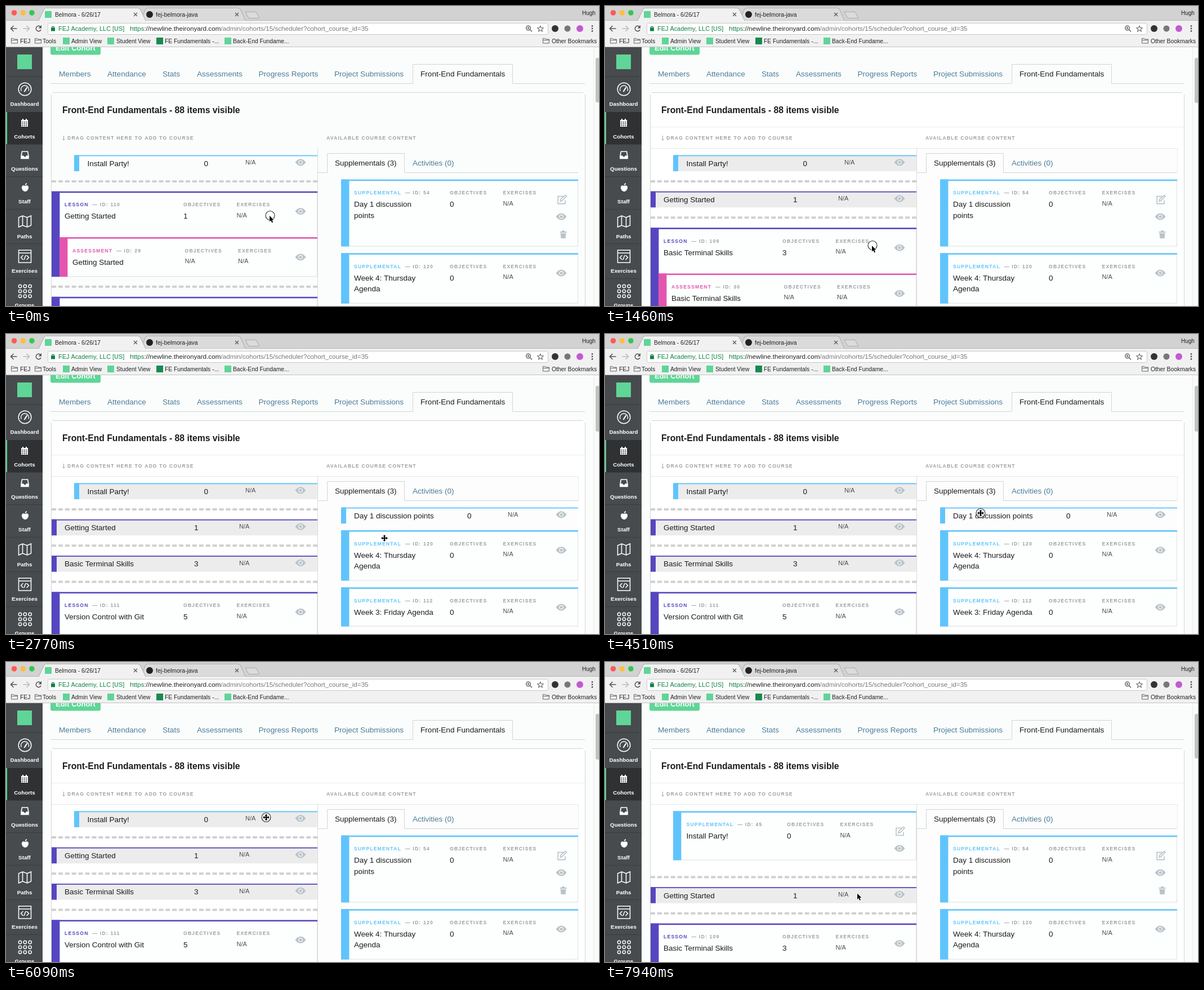
An HTML page with a canvas for the animation above (7990 ms loop, 1053 px wide and 532 px high).

```html
<!DOCTYPE html>
<html lang="en">
<head>
<meta charset="utf-8">
<title>Course scheduler</title>
<style>
  html, body { margin: 0; width: 100%; height: 100%; overflow: hidden; background: #fbfdfd; }
  canvas { display: block; }
</style>
</head>
<body>
<canvas id="stage" width="1053" height="532"></canvas>
<script>
const c = document.getElementById('stage').getContext('2d');
const LOOP = 7990;
const SANS = '"Liberation Sans", Arial, sans-serif';
const BLUE = '#60c4fc', PURPLE = '#5646c0', PINK = '#e455b0', GREEN = '#5fd597';
const INK = '#1c1c1c', LABEL = '#9c9fa2', LINK = '#4b7c98', ICON = '#bac3c8', LINE = '#d2d4d5';

// Drawing helpers
function rect(x, y, w, h, fill) { c.fillStyle = fill; c.fillRect(x, y, w, h); }
function round(x, y, w, h, r, fill, stroke) {
  c.beginPath(); c.roundRect(x, y, w, h, r); paint(fill, stroke);
}
function disc(x, y, r, fill, stroke, width) {
  c.beginPath(); c.arc(x, y, r, 0, 7); paint(fill, stroke, width);
}
function paint(fill, stroke, width = 1) {
  if (fill) { c.fillStyle = fill; c.fill(); }
  if (stroke) { c.strokeStyle = stroke; c.lineWidth = width; c.stroke(); }
}
function poly(points, fill, stroke, width) {
  c.beginPath();
  for (let i = 0; i < points.length; i += 2) c.lineTo(points[i], points[i + 1]);
  paint(fill, stroke, width);
}
function shape(d, x, y, fill, stroke, width) {
  c.save(); c.translate(x, y);
  const p = new Path2D(d);
  if (fill) { c.fillStyle = fill; c.fill(p); }
  if (stroke) { c.strokeStyle = stroke; c.lineWidth = width || 1; c.stroke(p); }
  c.restore();
}
function text(s, x, y, size = 13.5, color = INK, weight = '', align = 'left', gap = 0) {
  c.font = `${weight} ${size}px ${SANS}`;
  c.letterSpacing = gap + 'px';
  c.textAlign = align;
  c.fillStyle = color;
  c.fillText(s, x, y);
}
const label = (s, x, y, color = LABEL) => text(s, x, y + 3, 8.6, color, 'bold', 'left', 1.2);
const small = (s, x, y) => text(s, x, y + 4, 11, '#4a4d50');

// Small icons
function eye(x, y) {
  shape('M-9.5 0Q-5-6 0-6T9.5 0Q5 6 0 6T-9.5 0Z', x, y, ICON);
  disc(x, y, 3.8, '#fff');
  disc(x, y, 2.6, ICON);
}
function edit(x, y) {
  shape('M3-6H-7V7H6V1M-3 3L-2-1L6-8L8-6L0 2Z', x, y, null, ICON, 1.6);
}
function trash(x, y) {
  shape('M-6-5H6V-3H-6ZM-2-7H2V-5H-2ZM-5-2H5L4 7H-4Z', x, y, ICON);
}
function folder(x, y) {
  shape('M.5 1.5H4.5L6 3H11.5V10H.5ZM.5 4.5H11.5', x, y, null, '#666');
}

function browser() {
  rect(0, 0, 1053, 26, '#d3d2d3');
  rect(0, 25, 1053, 1, '#b4b4b4');
  rect(0, 26, 1053, 47, '#f2f1f2');
  ['#fc5b57', '#fdbd41', '#35c84a'].forEach((col, i) => disc(14.5 + i * 15.7, 12, 4.8, col));
  poly([239, 25.5, 248, 5, 251, 3.5, 412, 3.5, 416, 5, 425, 25.5], '#dcdbdc', '#aaa');
  poly([425, 10.5, 444, 10.5, 450, 21.5, 431, 21.5, 425, 10.5], '#dcdbdc', '#aaa');
  poly([58, 26, 68, 5, 71, 3.5, 234, 3.5, 238, 5, 248, 26], '#f2f1f2', '#aaa');
  rect(59, 25, 188, 2, '#f2f1f2');
  rect(69, 9, 12, 12, GREEN);
  disc(255, 15, 6, '#222');
  text('Belmora - 6/26/17', 87, 18.5, 10.2, '#222');
  text('fej-belmora-java', 266, 18.5, 10.4, '#222');
  for (const x of [230, 410]) shape('M-3-3L3 3M3-3L-3 3', x, 15, null, '#555', 1.2);
  text('Hugh', 1023, 16, 10, '#222');

  // Toolbar
  shape('M5-5L0 0L5 5M0 0H11', 8.5, 40, null, '#555', 1.6);
  shape('M6-5L11 0L6 5M11 0H0', 30.5, 40, null, '#bcbcbc', 1.6);
  c.beginPath(); c.arc(58, 40, 4.6, .5, 5.4); paint(null, '#555', 1.6);
  poly([63, 34, 63, 39.5, 57.5, 39.5], '#555');
  round(74.5, 30.5, 888, 20, 2, '#fff', '#c9c9c9');
  rect(80, 38.5, 7, 6, '#0b8043');
  c.beginPath(); c.arc(83.5, 38.5, 2.2, Math.PI, 0); paint(null, '#0b8043', 1.3);
  text('FEJ Academy, LLC [US]', 93, 44, 10.9, '#0b8043');
  text('https', 220, 44, 11.67, '#0b8043');
  text('://newline.theironyard.com', 245.3, 44, 11.67, '#222');
  text('/admin/cohorts/15/scheduler?cohort_course_id=35', 381.5, 44, 11.67, '#777');
  disc(927.5, 39, 3.8, null, '#555', 1.3);
  shape('M3 3L6.5 6.5M-2 0H2M0-2V2', 927.5, 39, null, '#555', 1.2);
  c.beginPath();
  for (let i = 0; i < 11; i++) {
    const r = i % 2 ? 2.4 : 5.5, a = i * Math.PI / 5 - Math.PI / 2;
    c.lineTo(949 + r * Math.cos(a), 40.5 + r * Math.sin(a));
  }
  paint(null, '#666', 1.1);
  disc(975, 40, 6, '#333');
  disc(997, 40, 5.5, '#777');
  disc(1019, 40, 6, '#c05bd0');
  for (const y of [35.5, 40, 44.5]) disc(1041, y, 1.4, '#555');

  // Bookmarks
  const mark = (s, x) => text(s, x, 65.5, 10.3, '#222');
  folder(9, 56); mark('FEJ', 25);
  folder(51, 56); mark('Tools', 65);
  rect(101, 56, 12, 12, GREEN); mark('Admin View', 116);
  rect(180, 56, 12, 12, GREEN); mark('Student View', 196);
  rect(267, 56, 12, 12, '#188a50'); mark('FE Fundamentals -...', 282);
  rect(388, 56, 12, 12, GREEN); mark('Back-End Fundame...', 403);
  folder(953, 56); mark('Other Bookmarks', 969);
  rect(0, 72, 1053, 1, '#c4c4c4');
}

function sidebar() {
  rect(0, 73, 65, 459, '#484b4e');
  for (const y of [125, 245, 302, 360, 421, 483]) rect(0, y, 65, 1, '#3a3d40');
  rect(0, 188, 65, 57, '#2f3133');
  rect(0, 188, 2, 57, GREEN);
  rect(20, 86, 26, 26, GREEN);
  [['Dashboard', 173.5], ['Cohorts', 231], ['Questions', 288.5], ['Staff', 346],
   ['Paths', 408], ['Exercises', 469.5], ['Groups', 530.5]]
    .forEach(([s, y]) => text(s, 33, y + 3.5, 9.8, '#fff', 'bold', 'center'));

  const w = '#fff';
  disc(33.5, 147.5, 11.3, null, w, 1.5);
  c.beginPath(); c.arc(33.5, 148, 7, 2.7, 6.7); paint(null, w, 1.3);
  shape('M-1 4L4-4', 33.5, 148, null, w, 2);
  shape('M-6-5H6V7H-6ZM-4-7H-2V-5H-4ZM2-7H4V-5H2Z', 33, 207, w);
  for (let i = 0; i < 9; i++) rect(28.5 + i % 3 * 3.4, 205 + (i / 3 | 0) * 3, 2, 1.6, '#2f3133');
  shape('M-5-6H5L6.5 2V6.5H-6.5V2ZM-6 2H-3L-2 4H2L3 2H6', 33.5, 264, null, w, 1.7);
  shape('M-6 2H-3L-2 4H2L3 2H6V7H-6Z', 33.5, 264, w);
  shape('M0-3C7-6 8 2 3 6Q0 8-3 6C-8 2-7-6 0-3ZM0-4Q0-8 3-8Q3-5 0-4Z', 34, 322, w);
  shape('M-11-7L-4-10L4-7L11-10V7L4 10L-4 7L-11 10ZM-4-10V7M4-7V10', 33.5, 382, null, w, 1.5);
  shape('M-11-11H11V11H-11ZM-11-6H11M-3-2L-7 2L-3 6M3-2L7 2L3 6M1.5-2L-1.5 6', 33.5, 444, null, w, 1.5);
  for (let i = 0; i < 9; i++) disc(25 + i % 3 * 8.8, 497 + (i / 3 | 0) * 8.8, 2.7, null, w, 1.4);
}

function page(settled) {
  rect(65, 73, 988, 459, '#fbfdfd');
  if (settled) {
    rect(81, 155, 947, 377, '#fff');
    rect(554, 253, 462, 279, '#fdfdfd');
    rect(81, 214, 946, 1, '#ececec');
    rect(81, 252, 935, 1, '#e6e7e7');
    rect(1016, 252, 1, 43, '#ececec');
  }
  round(79, 60, 89, 26.5, 3, GREEN);
  text('Edit Cohort', 88, 79, 13, '#fff', 'bold');
  [['Members', 94], ['Attendance', 180], ['Stats', 278], ['Assessments', 339],
   ['Progress Reports', 448.5], ['Project Submissions', 583]]
    .forEach(([s, x]) => text(s, x, 125.3, 13.6, LINK));
  poly([79, 137.5, 722.5, 137.5, 722.5, 103.5, 899.5, 103.5, 899.5, 137.5, 1028, 137.5], null, LINE);
  text('Front-End Fundamentals', 736, 125.3, 13.6);
  rect(83, 153, 942, 1, LINE);
  rect(80, 157, 1, 375, LINE);
  rect(1028, 157, 1, 375, LINE);
  text('Front-End Fundamentals - 88 items visible', 100, 190.4, 15.7, INK, 'bold');
  shape('M0-4V4M-2 2L0 4L2 2', 102.5, 234, null, LABEL);
  label('DRAG CONTENT HERE TO ADD TO COURSE', 109, 233.5);
  label('AVAILABLE COURSE CONTENT', 569, 233.5);
  rect(553, 252, 1, 280, '#dcdddd');
  poly([554, 295.5, 570.5, 295.5, 570.5, 261.5, 707.5, 261.5, 707.5, 295.5, 1016, 295.5], null, LINE);
  text('Supplementals (3)', 584, 283);
  text('Activities (0)', 722, 283, 13.5, LINK);
}

function closedRow(o) {
  const { x, y, right, color } = o;
  rect(x, y, right - x, 28.5, o.fill);
  rect(x, y, right - x, 1.8, color);
  rect(x, y, 9, 28.5, color);
  text(o.title, o.textX, y + 19.3);
  text(o.count, o.countX, y + 19.3);
  small('N/A', o.naX, y + 12.7);
  eye(right - 30, y + 12.7);
}

// "objX" is the column of objectives; exercises stand 94.5 px to its right.
function card(o) {
  const { x, y, right, color, objX } = o;
  rect(x, y, right - x, o.h, '#fdfefe');
  rect(x, y + o.h - 1, right - x, 1, '#dfe1e2');
  rect(right - 1, y, 1, o.h, '#dfe1e2');
  rect(x, y, right - x, 2.6, color);
  rect(x, y, 14.4, o.h, color);
  const tx = o.textX;
  label(o.kind, tx, y + 23.5, color);
  label('— ID: ' + o.id, tx + c.measureText(o.kind).width + 7, y + 23.5);
  label('OBJECTIVES', objX, y + 23.5);
  label('EXERCISES', objX + 94.5, y + 23.5);
  o.title.split('|').forEach((s, i) => text(s, tx, y + 48.5 + i * 19.7));
  if (o.count === 'N/A') small('N/A', objX, y + 42);
  else text(o.count, objX, y + 48.5);
  small('N/A', objX + 94.5, y + 42);
  if (o.editable) { edit(right - 29, y + 36); eye(right - 30, y + 66); }
  else eye(right - 30, y + 35.3);
  if (o.removable) trash(right - 26.5, y + 97.5);
}

function dashes(y) {
  c.setLineDash([8, 3.9]);
  poly([81, y, 553, y], null, '#d0d0d0', 4);
  c.setLineDash([]);
}

function lesson(y, title, id, quizId, count, open) {
  const base = { x: 81, y, right: 553, color: PURPLE, kind: 'LESSON', textX: 104, title, id, count };
  if (!open) {
    closedRow({ ...base, fill: '#ececec', countX: 334, naX: 414 });
    dashes(y + 46.5);
    return y + 64.4;
  }
  card({ ...base, h: 151.5, objX: 315 });
  card({ ...base, x: 95, y: y + 81.3, h: 70.2, color: PINK, kind: 'ASSESSMENT', id: quizId,
         textX: 118, objX: 317.5, count: 'N/A' });
  dashes(y + 169);
  return y + 187;
}

function courseList(s) {
  const party = { x: 121, y: 264.5, right: 553, color: BLUE, kind: 'SUPPLEMENTAL', id: 45,
                  textX: 144.5, title: 'Install Party!', count: '0' };
  let y = 328.7;
  if (s.partyOpen) {
    card({ ...party, h: 87, objX: 323, editable: true });
    y = 399.2;
  } else {
    closedRow({ ...party, fill: s.settled ? '#ececec' : '#fbfdfd', countX: 351.5, naX: 425 });
  }
  dashes(y - 17.8);
  y = lesson(y, 'Getting Started', 110, 29, '1', s.startOpen);
  y = lesson(y, 'Basic Terminal Skills', 109, 30, '3', s.basicOpen);
  lesson(y, 'Version Control with Git', 111, 31, '5', true);
}

function contentList(s) {
  const base = { x: 595, right: 1016, color: BLUE, kind: 'SUPPLEMENTAL', textX: 618, objX: 788, count: '0' };
  let y = 307.6;
  if (s.dayOpen) {
    card({ ...base, y, h: 118.8, id: 54, title: 'Day 1 discussion|points', editable: true, removable: true });
    y += 130.6;
  } else {
    closedRow({ ...base, y, fill: '#fdfdfd', title: 'Day 1 discussion points', countX: 819, naX: 891 });
    y += 40.4;
  }
  card({ ...base, y, h: 89.4, id: 120, title: 'Week 4: Thursday|Agenda' });
  card({ ...base, y: y + 101.3, h: 69.4, id: 112, title: 'Week 3: Friday Agenda' });
}

function scrollbar(s) {
  rect(1043, 73, 10, 459, '#fafafa');
  rect(1043, 73, 1, 459, '#ebebeb');
  const end = 171 + !s.startOpen + !s.basicOpen - s.partyOpen;
  round(1047, 92, 7, end - 92, 3, '#c2c2c2');
}

// Pointer stops: time, x, y
const stops = [
  [0, 468, 372], [120, 468, 372], [540, 467.5, 376], [840, 467.5, 376], [980, 474, 425],
  [1580, 474, 425], [2000, 672, 362], [3970, 672, 362], [4350, 667, 317.5],
  [4630, 667, 317.5], [4740, 665, 322], [4860, 665, 322], [5610, 462, 273],
  [5670, 462, 273], [5900, 462, 275.5], [6210, 462, 275.5], [6420, 459, 319],
  [6480, 459, 319], [6780, 452.5, 469.5], [7200, 447, 473], [7500, 447, 473],
  [7700, 448, 410.5], [LOOP, 448, 410.5]
];
const clicks = [[0, 180], [1340, 1580], [2480, 2680], [4430, 4630], [6030, 6210], [7320, 7500], [7880, 7940]];

function pointerAt(t) {
  const i = stops.findIndex(p => p[0] > t);
  const [t0, x0, y0] = stops[i - 1], [t1, x1, y1] = stops[i];
  const u = (t - t0) / (t1 - t0), k = u * u * (3 - 2 * u);
  const dip = t0 === 4860 ? 143 * Math.sin(Math.PI * k) : 0;
  return [x0 + (x1 - x0) * k, y0 + (y1 - y0) * k + dip];
}

function pointer(t) {
  const [x, y] = pointerAt(t);
  const move = t > 1760 && t < 6250;
  if (clicks.some(([a, b]) => t >= a && t < b))
    disc(x + (move ? 0 : 1), y - (move ? 0 : .5), 8, 'rgba(255,255,255,.6)', '#222', 1.1);
  const d = move
    ? 'M0-6L2.5-3H1V-1H3V-2.5L6 0L3 2.5V1H1V3H2.5L0 6L-2.5 3H-1V1H-3V2.5L-6 0L-3-2.5V-1H-1V-3H-2.5Z'
    : 'M0 0V10.5L2.4 8.2L4.2 12.2L6 11.4L4.3 7.5H7.4Z';
  shape(d, x, y, null, '#fff', 1.6);
  shape(d, x, y, '#000');
}

function draw(now) {
  const t = now % LOOP;
  const s = {
    settled: t >= 120,
    startOpen: t < 120,
    basicOpen: t < 1520 || t >= 7440,
    dayOpen: t < 2600 || t >= 4570,
    partyOpen: t >= 6150
  };
  page(s.settled);
  courseList(s);
  contentList(s);
  scrollbar(s);
  sidebar();
  browser();
  pointer(t);
}

const start = performance.now();
function tick() {
  draw(performance.now() - start);
  requestAnimationFrame(tick);
}
tick();
</script>
</body>
</html>
```
